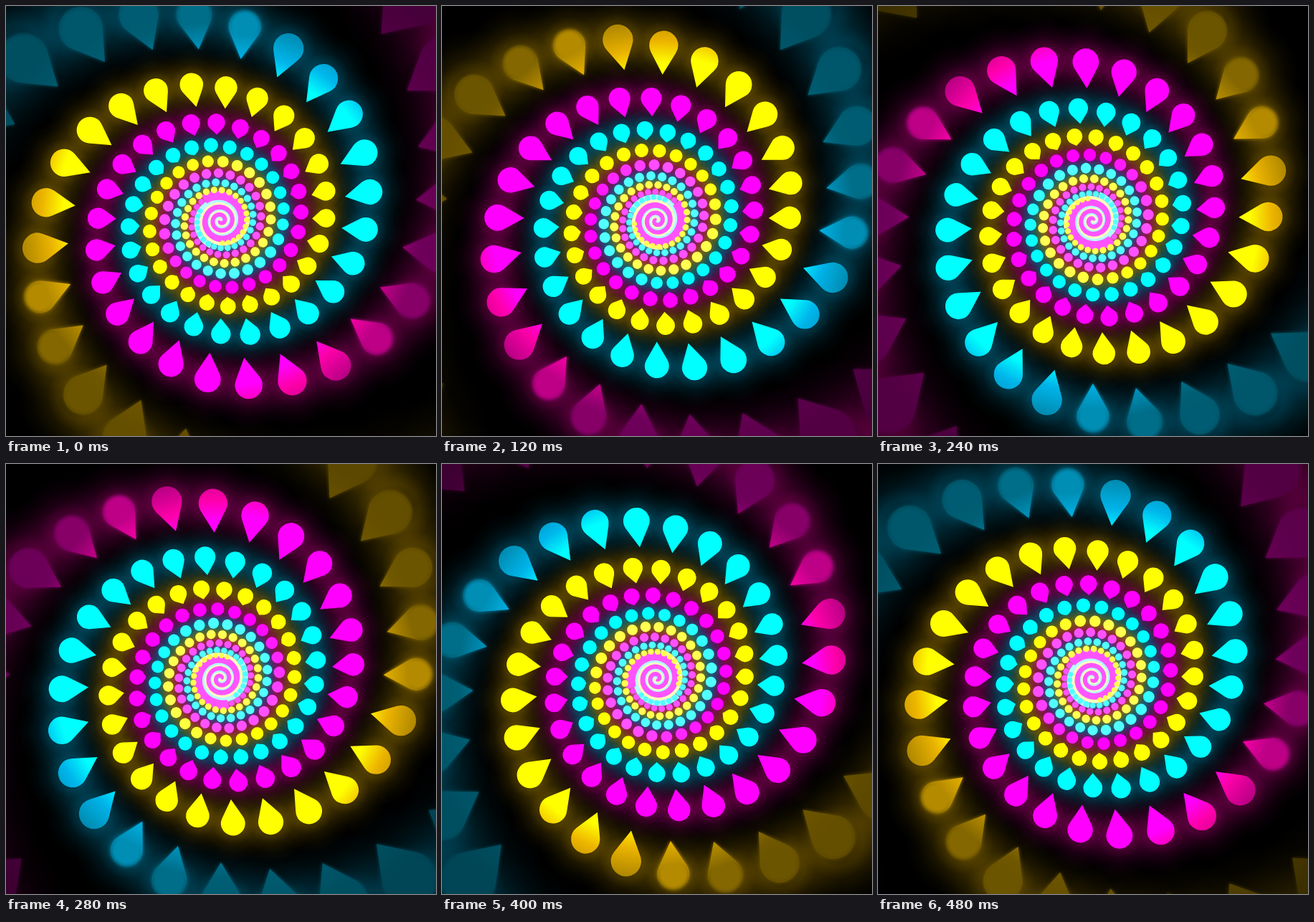
Animation of 600 by 600 pixels, one loop 0.5 s. Source, as an HTML page with a canvas:

```html
<!DOCTYPE html>
<html lang="en">
<head>
<meta charset="utf-8">
<title>Drop spiral</title>
<style>
html, body { margin: 0; width: 100%; height: 100%; overflow: hidden; background: #000; }
canvas { display: block; width: 600px; height: 600px; }
</style>
</head>
<body>
<canvas id="stage" width="600" height="600"></canvas>
<script>
const ctx = document.getElementById('stage').getContext('2d');
const LOOP = 500, STEP = 20, PER_TURN = 25;
const CENTER = 299.5;
const FIRST_ANGLE = -2.5;

// Each arm has its full colour, the colour it cools to, and its far colour.
const ARMS = [
  { bright: [255, 0, 255], warm: [255, 0, 170], dim: [112, 0, 92] },
  { bright: [255, 255, 0], warm: [238, 182, 0], dim: [112, 88, 0] },
  { bright: [0, 255, 255], warm: [0, 182, 236], dim: [0, 96, 118] }
];

const clamp = (v, lo = 0, hi = 1) => Math.min(hi, Math.max(lo, v));
const mix = (a, b, k) => a.map((v, i) => v + (b[i] - v) * k);
const rgba = (c, alpha = 1) => `rgba(${c.map(Math.round).join(',')},${alpha})`;
const WHITE = [255, 255, 255], BLACK = [0, 0, 0];

// Distance from the centre at a given age: exponential, speeding up outside.
const radiusAt = age =>
  Math.exp(4.841 + 0.00128 * age + 0.234 * Math.exp((age - 260) / 200));

const armAngle = arm => FIRST_ANGLE + arm * 120;

function armColor(arm, r) {
  if (r < 92) return mix(arm.bright, WHITE, clamp((92 - r) / 45, 0, 0.32));
  if (r < 242) return mix(arm.bright, arm.warm, clamp((r - 227) / 15));
  if (r < 284) return mix(arm.warm, arm.dim, (r - 242) / 42);
  return mix(arm.dim, BLACK, clamp((r - 284) / 300, 0, 0.75));
}

function dropShape(r) {
  const stretch = clamp((r - 95) / 95);
  const far = clamp((r - 260) / 200);
  const size = r * (0.084 + 0.035 * Math.exp(-r / 80)) * (1 + 0.5 * far);
  const tip = r * (0.905 - 0.036 * stretch);
  const outer = r * (1.09 + 0.04 * stretch + 0.06 * far);
  return { size, tip, outer, far, mid: outer - size };
}

function drawGlow({ arm, r, shape }) {
  const reach = shape.size * 3.2;
  const x = shape.mid + shape.size * shape.far;
  const strength = 0.28 - 0.1 * shape.far;
  const g = ctx.createRadialGradient(x, 0, 0, x, 0, reach);
  g.addColorStop(0, rgba(arm.warm, strength));
  g.addColorStop(0.36, rgba(arm.warm, strength * 0.9));
  g.addColorStop(0.55, rgba(arm.warm, strength * 0.4));
  g.addColorStop(0.78, rgba(arm.warm, strength * 0.13));
  g.addColorStop(1, rgba(arm.warm, 0));
  ctx.fillStyle = g;
  ctx.fillRect(x - reach, -reach, reach * 2, reach * 2);
}

function drawDrop({ arm, r, shape }) {
  const { size, tip, outer, mid } = shape;
  if (r < 195) {
    ctx.fillStyle = rgba(armColor(arm, r));
  } else {
    const g = ctx.createRadialGradient(0, 0, tip, 0, 0, outer);
    for (let k = 0; k <= 1; k += 0.125) {
      const here = tip + (outer - tip) * k;
      g.addColorStop(k, rgba(armColor(arm, r + (here - r) * 0.5)));
    }
    ctx.fillStyle = g;
  }
  const distant = r > 250;
  ctx.globalCompositeOperation = distant ? 'lighten' : 'source-over';
  ctx.shadowBlur = distant ? 5 : 0;
  ctx.shadowColor = distant ? rgba(armColor(arm, r)) : 'transparent';
  ctx.beginPath();
  const reach = mid - tip;
  if (reach > size * 1.02) {
    const turn = Math.PI - Math.acos(size / reach);
    ctx.moveTo(tip, 0);
    ctx.arc(mid, 0, size, -turn, turn);
    ctx.closePath();
  } else {
    ctx.arc(mid, 0, size, 0, Math.PI * 2);
  }
  ctx.fill();
  ctx.shadowBlur = 0;
}

function collectDrops(t) {
  const drops = [];
  ARMS.forEach((arm, a) => {
    for (let i = 0; i < PER_TURN; i++) {
      const phase = t - LOOP * i / PER_TURN;
      const angle = (armAngle(a) + i * 360 / PER_TURN - 90) * Math.PI / 180;
      for (let age = phase + 2 * LOOP; age > -1100; age -= LOOP) {
        if (age > 540) continue;
        const r = radiusAt(age);
        drops.push({ arm, r, angle, shape: dropShape(r) });
      }
    }
  });
  return drops.sort((p, q) => q.r - p.r);
}

function eachDrop(drops, draw) {
  for (const drop of drops) {
    ctx.save();
    ctx.rotate(drop.angle);
    draw(drop);
    ctx.restore();
  }
}

// The innermost turns are evenly spaced and end at the centre.
const coreRadius = age => age > -1400 ? radiusAt(age) : 21.1 * (age + 2400) / 1000;

function drawBand(index, t, half, color) {
  const point = (age, side) => {
    const angle = ((t - age) / LOOP * 360 + armAngle(index) - 90) * Math.PI / 180;
    const base = coreRadius(age);
    const r = Math.max(0, base + side * half * Math.max(base, 17));
    ctx.lineTo(r * Math.cos(angle), r * Math.sin(angle));
  };
  ctx.beginPath();
  for (let age = -950; age > -2400; age -= 10) point(age, 1);
  for (let age = -2400; age <= -950; age += 10) point(age, -1);
  ctx.closePath();
  ctx.fillStyle = color;
  ctx.fill();
}

function softDisc(radius, color, solid) {
  const g = ctx.createRadialGradient(0, 0, radius * solid, 0, 0, radius);
  g.addColorStop(0, rgba(color, 1));
  g.addColorStop(1, rgba(color, 0));
  ctx.fillStyle = g;
  ctx.beginPath();
  ctx.arc(0, 0, radius, 0, Math.PI * 2);
  ctx.fill();
}

function drawCore(t) {
  softDisc(42, [255, 245, 255], 0.6);
  drawBand(1, t, 0.1, 'rgb(255,255,190)');
  drawBand(2, t, 0.1, 'rgb(180,255,255)');
  drawBand(0, t, 0.18, 'rgb(255,84,255)');
}

function render(t) {
  ctx.setTransform(1, 0, 0, 1, 0, 0);
  ctx.globalCompositeOperation = 'source-over';
  ctx.fillStyle = '#000';
  ctx.fillRect(0, 0, 600, 600);
  ctx.translate(CENTER, CENTER);
  const drops = collectDrops(t);
  ctx.globalCompositeOperation = 'lighter';
  eachDrop(drops, drawGlow);
  ctx.globalCompositeOperation = 'source-over';
  drawCore(t);
  eachDrop(drops, drawDrop);
}

let start = null, shown = -1;
function tick(now) {
  if (start === null) start = now;
  const t = Math.floor(((now - start) % LOOP) / STEP) * STEP;
  if (t !== shown) render(shown = t);
  requestAnimationFrame(tick);
}
render(0);
requestAnimationFrame(tick);
</script>
</body>
</html>
```
